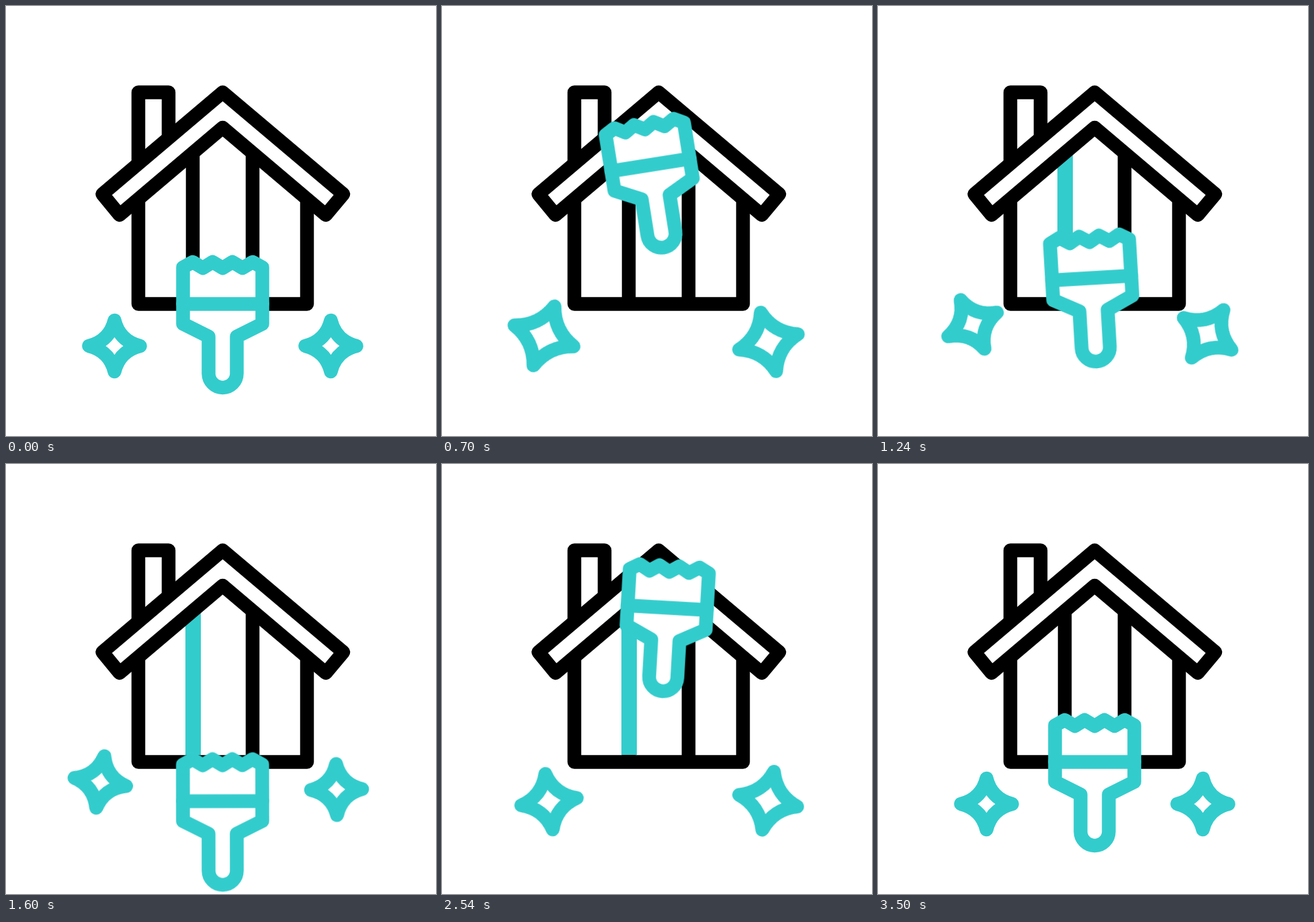
Write an HTML page without scripts that moves like this. It is 640 px wide and 640 px high and loops after 3600 ms.

```html
<!DOCTYPE html>
<html lang="en">
<head>
<meta charset="utf-8">
<title>House painting</title>
<style>
  :root { --teal: #33cccc; --ease: cubic-bezier(.333, 0, .667, 1); }
  html, body { margin: 0; width: 100%; height: 100%; overflow: hidden; background: #fff; }
  svg { display: block; width: 100vw; height: 100vh; }
  path { stroke-width: 20.5; stroke-linecap: round; stroke-linejoin: round; }
  .house path { fill: #fff; stroke: #000; }
  .house .bare { fill: none; }
  .tool path { fill: #fff; stroke: var(--teal); }

  .brush, .star, .house .paint { animation: 3600ms var(--ease) infinite; }
  .brush { transform-origin: 322.5px 464px; }
  .brush.moving { animation-name: sweep, tilt, fade-out; }
  .brush.resting { animation-name: fade-in; }

  .house .paint {
    fill: none; stroke: var(--teal); stroke-width: 23; stroke-linecap: butt;
    stroke-dasharray: 400; animation-name: paint, fade-out;
  }

  .star {
    fill: none; stroke: var(--teal);
    animation-name: drift, turn, swell;
    animation-delay: var(--delays, 0s);
  }
  .left { --dx: -22px; --dy: -34px; --turn: 180deg; --delays: -150ms, -80ms, -120ms; }
  .right { --dx: 8.5px; --dy: -21.5px; --turn: -180deg; }

  @keyframes sweep {
    0%, 4.44% { translate: 0 0; }
    17.78% { translate: -9px -210px; }
    46.11% { translate: 0 61px; animation-timing-function: cubic-bezier(.31, .18, .62, .6); }
    57.22% { translate: 5px -99px; animation-timing-function: cubic-bezier(.26, .52, .57, 1); }
    75.56% { translate: 12px -239px; }
    93.33%, 97.22% { translate: 22px -307px; }
    97.23%, 100% { translate: 0 0; }
  }
  @keyframes tilt {
    0%, 4.44% { rotate: 0deg; }
    17.78% { rotate: -9.1deg; }
    46.11%, 57.22% { rotate: 0deg; }
    75.56% { rotate: 4deg; }
    93.33%, 97.22% { rotate: 8deg; }
    97.23%, 100% { rotate: 0deg; }
  }
  @keyframes paint {
    0%, 17.77% { stroke-dashoffset: 400; }
    17.78% { stroke-dashoffset: 372; }
    46.11%, 100% { stroke-dashoffset: 101; }
  }
  @keyframes fade-out {
    0%, 91.67% { opacity: 1; animation-timing-function: linear; }
    97.22%, 100% { opacity: 0; }
  }
  @keyframes fade-in {
    0%, 91.67% { opacity: 0; animation-timing-function: linear; }
    97.22%, 100% { opacity: 1; }
  }
  @keyframes drift {
    0%, 6.11%, 82.22%, 100% { translate: 0 0; }
    44.17% { translate: var(--dx) var(--dy); }
  }
  @keyframes turn {
    0%, 6.11% { rotate: 0deg; }
    82.22%, 100% { rotate: var(--turn); }
  }
  @keyframes swell {
    0%, 6.11%, 44.17%, 82.22%, 100% {
      d: path("M0 -38Q7.5 -7.5 38 0Q7.5 7.5 0 38Q-7.5 7.5 -38 0Q-7.5 -7.5 0 -38Z");
    }
    25.14%, 63.19% {
      d: path("M0 -47Q12 -12 47 0Q12 12 0 47Q-12 12 -47 0Q-12 -12 0 -47Z");
    }
  }
</style>
</head>
<body>
<svg viewBox="0 0 640 640">
  <defs>
    <g id="brush" class="tool">
      <path d="M263.5 389L278 381L293 390L307.5 381L322.5 390L337 381L352 390L367 381L381.5 389V473L343.5 492V547A21 21 0 0 1 301.5 547V492L263.5 473Z"/>
      <path d="M263.5 443.5H381.5"/>
    </g>
  </defs>

  <g class="house">
    <path class="bare" d="M278 215V440M367 215V440"/>
    <path class="paint" d="M278.5 205V433"/>
    <path class="bare" d="M197 285V443.5H448V285"/>
    <path d="M197 240V128.5H242V205"/>
    <path d="M322.5 128.5L502 280L476 311L322.5 181L169 311L143.5 280Z"/>
  </g>

  <g transform="translate(161.5 506)">
    <path class="star left" d="M0 -38Q7.5 -7.5 38 0Q7.5 7.5 0 38Q-7.5 7.5 -38 0Q-7.5 -7.5 0 -38Z"/>
  </g>
  <g transform="translate(483.5 506)">
    <path class="star right" d="M0 -38Q7.5 -7.5 38 0Q7.5 7.5 0 38Q-7.5 7.5 -38 0Q-7.5 -7.5 0 -38Z"/>
  </g>

  <use class="brush moving" href="#brush"/>
  <use class="brush resting" href="#brush"/>
</svg>
</body>
</html>
```
